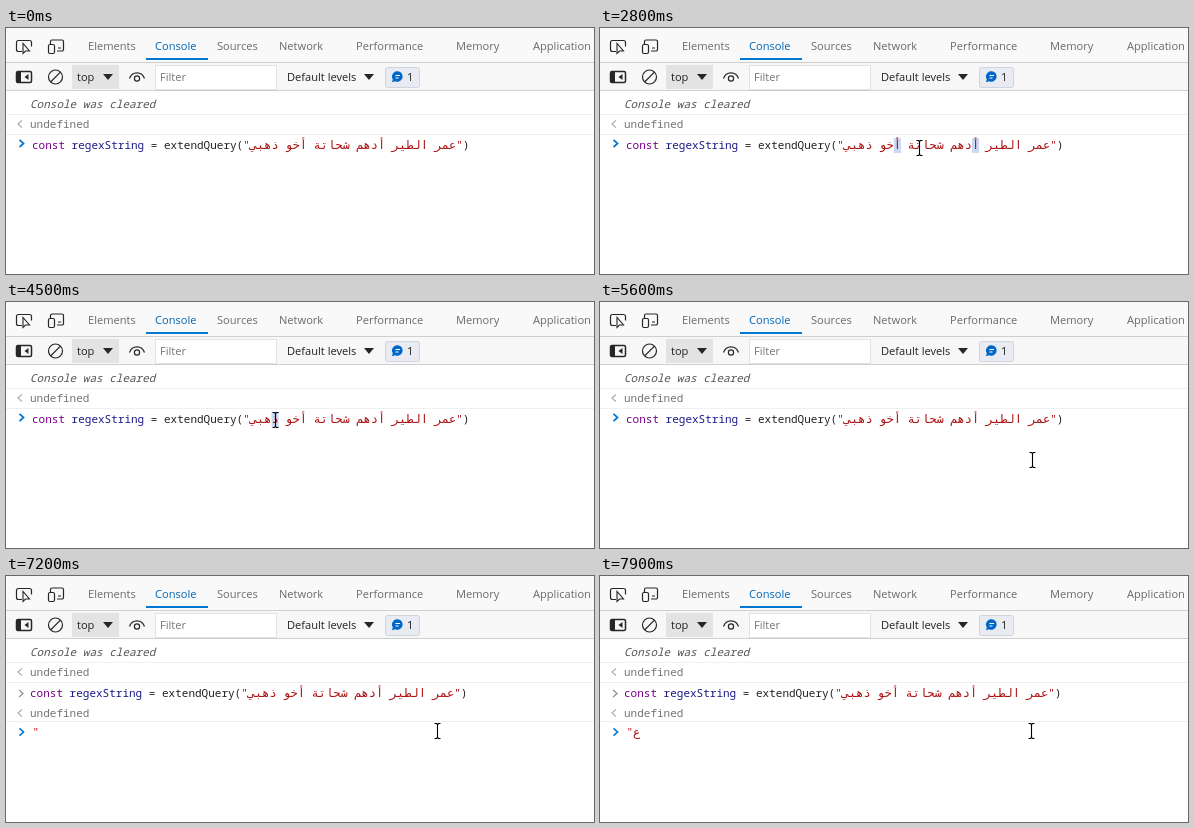
Recreate the animation shown at these times as an HTML page. Size 588 px wide and 246 px high, loop 8000 ms.

```html
<!DOCTYPE html>
<html lang="en">
<head>
<meta charset="utf-8">
<title>Console</title>
<style>
html, body { margin: 0; width: 100%; height: 100%; overflow: hidden; background: #fff; }
svg { display: block; width: 588px; height: 246px; }
text { white-space: pre; }
.ui { font: 11.1px "Open Sans", "Noto Sans", sans-serif; fill: #222; }
.mono { font: 11px "Noto Sans Mono", "DejaVu Sans Mono", monospace; fill: #222; }
.ar { font: 12px "DejaVu Sans Mono", monospace; word-spacing: -.62px; }
.small { font: 9.3px "DejaVu Sans", sans-serif; }
.str { fill: #a11; }
.line { fill: none; stroke-width: 1.2; }
</style>
</head>
<body>
<svg id="stage" viewBox="0 0 588 246" direction="ltr"></svg>
<script>
const LOOP = 8000, STEP = 100;
const ENTER = 5900, QUOTE = 7200, POPUP = 7300, LETTER = 7800;
const GLYPH = 7.22, SPACE = 6.6, PHRASE_RIGHT = 450.1;
const PHRASE = 'عمر الطير أدهم شحاتة أخو ذهبي';

// Pointer path: time, x, y
const PATH = [
  [700, 600, 70], [900, 575, 100], [1200, 430, 152], [1400, 300, 70],
  [1600, 220, -5], [1800, 232, 34], [2100, 345, 108], [2300, 381, 118],
  [2500, 373, 119], [2800, 319.5, 120], [3000, 314, 118], [3200, 307, 118],
  [3400, 305, 119], [3700, 250, 118], [3900, 242, 118], [4100, 246, 118],
  [4300, 271, 118], [4500, 269, 118], [4700, 266, 119], [5000, 420, 184],
  [5400, 436, 165], [5700, 431.5, 155]
];

// Selected letter: from, to, letter (every match lights up)
const PICKS = [[2400, 3000, 'أ'], [3100, 3500, 'ة'], [3800, 4200, 'ي'], [4400, 4800, 'ذ']];

const HISTORY = [
  '"sulayman tarek".replace(/\\s+/," ")',
  '"sulayman qudaimat".trim().match(/[ao]h/g)',
  '"sulayman qudaimat".trim().match(/\\s/g)',
  '"sulayman qudaimat".trim().match(/ham/g)',
  '"sulayman qudaimat".trim().replace(/\\s/g," ")',
  '"sulayman qudaimat".trim().replace(/\\s/g,"\\s")',
  '"sulayman qudaimat".trim().replace(/\\s/g,/\\s/)',
  '"<tspan class="small">أدهم سيفالزهر شحاتة بهجت نورالحق</tspan>".replace(/<tspan class="small">زهر</tspan>/,"")'
];

const TABS = [['Elements', 82], ['Console', 149], ['Sources', 211], ['Network', 273],
  ['Performance', 350], ['Memory', 450], ['Application', 527]];

const text = (x, y, str, cls, style = '') =>
  `<text x="${x}" y="${y}" class="${cls}" style="${style}">${str}</text>`;
const rect = (x, y, w, h, fill, attrs = '') =>
  `<rect x="${x}" y="${y}" width="${w}" height="${h}" fill="${fill}" ${attrs}/>`;
const path = (d, stroke, width = 1.2) =>
  `<path class="line" d="${d}" stroke="${stroke}" style="stroke-width:${width}"/>`;
const chevron = (x, y, color, width = 1.2, dir = 1) =>
  path(`M${x - 2 * dir} ${y - 3.6}l${4 * dir} 3.6l${-4 * dir} 3.6`, color, width);
const triangle = (x, y, color, r = 5, h = 6) =>
  `<path d="M${x - r} ${y - h / 2}h${2 * r}l${-r} ${h}z" fill="${color}"/>`;
const group = (id, body) => `<g id="${id}">${body}</g>`;

function toolbar() {
  const ink = '#262626', blue = '#0067b8';
  const tabs = TABS.map(([name, x]) =>
    text(x, 22, name, 'ui', `fill:${name === 'Console' ? blue : '#6a6a6a'}`)).join('');
  return rect(0, 0, 588, 34, '#f9f9f9') + rect(0, 34, 588, 28, '#f7f7f7') +
    rect(0, 34, 588, 1, '#cfcfcf') + rect(0, 62, 588, 1, '#cfcfcf') +
    path('M16 23.5h-3.5a2 2 0 0 1-2-2v-7a2 2 0 0 1 2-2h11a2 2 0 0 1 2 2v4', ink) +
    `<path d="M17 15.5v10l2.5-2.5h4z" fill="#f9f9f9" stroke="${ink}" stroke-width="1.1"/>` +
    path('M44.5 17v-3.5a1.5 1.5 0 0 1 1.5-1.5h10a1.5 1.5 0 0 1 1.5 1.5v8a1.5 1.5 0 0 1-1.5 1.5h-5M52 20h3', ink) +
    rect(42.5, 16.5, 6, 9, '#f9f9f9', `rx="1.5" stroke="${ink}" stroke-width="1.2"`) +
    tabs + rect(140, 30, 62, 2, '#0078d4') +
    rect(10.5, 43.5, 15, 11, 'none', `rx="1.5" stroke="${ink}" stroke-width="1.5"`) +
    rect(11, 44, 4, 10, ink) + `<path d="M22.5 46v6l-4-3z" fill="${ink}"/>` +
    `<circle cx="49.5" cy="49" r="7" class="line" stroke="${ink}"/>` + path('M44.6 54l9.8-9.9', ink) +
    rect(66, 37, 47, 24, '#e3e3e3') + text(71, 53, 'top', 'ui') + triangle(102, 49, ink) +
    path('M123.5 50.5c2.5-7.5 12.5-7.5 15 0', ink) +
    `<circle cx="131" cy="50.5" r="2.6" class="line" stroke="${ink}"/>` +
    rect(149.5, 37.5, 121, 24, '#fff', 'stroke="#e2e2e2"') + text(154, 53, 'Filter', 'ui', 'fill:#757575') +
    text(281, 53, 'Default levels', 'ui') + triangle(363, 49, ink) +
    rect(379.5, 39.5, 34, 20, '#e8ebf1', 'rx="2" stroke="#d0d4dc"') +
    '<path d="M387 45.5a5.3 5.3 0 1 1 2 7.8l-3 1 .8-3a5 5 0 0 1 .2-5.8z" fill="#0067c8"/>' +
    '<path d="M389.5 47.5h4.5M389.5 50h3" stroke="#fff"/>' +
    text(401, 53, '1', 'ui');
}

function command() {
  return text(26, 121,
    '<tspan fill="#708">const</tspan> <tspan fill="#1a1a86">regexString</tspan> = extendQuery(' +
    `<tspan class="str">"<tspan class="ar">${PHRASE}</tspan>"</tspan>)`, 'mono');
}

function popup() {
  const rows = HISTORY.map((code, i) => {
    const y = 11.5 + i * 18.3;
    return chevron(33.5, y, i ? '#3367d6' : '#111', 1.3) +
      text(i ? 508 : 376, y + 4, code, 'mono', 'text-anchor:end');
  }).join('');
  return rect(27, 2, 505, 152, '#000', 'opacity=".12"') +
    rect(26.5, .5, 503, 149.5, '#e8e8e8', 'stroke="#b8b8b8"') +
    rect(27, 2, 487, 18, '#fff') +
    rect(27.5, 2.5, 486, 17, 'none', 'stroke="#333" stroke-dasharray="1 1"') + rows +
    rect(483.5, 4.5, 25, 13, '#fff', 'rx="2" stroke="#c8c8c8"') +
    text(496, 14, 'tab', 'mono', 'text-anchor:middle;font-size:10px;fill:#777') +
    rect(514, 1, 15, 149, '#f1f1f1') + rect(514.5, 19, 13, 44, '#c1c1c1') +
    '<path d="M517.5 12.5h7l-3.5-4z" fill="#a3a3a3"/>' + triangle(521, 140, '#505050', 3.5, 4);
}

const stage = document.getElementById('stage');
stage.innerHTML = rect(0, 0, 588, 246, '#fff') + toolbar() +
  group('edge', rect(64, 0, 524, 1, '#cfcfcf')) +
  text(24, 80, 'Console was cleared', 'mono', 'font-style:italic;fill:#555') +
  rect(0, 86, 588, 1, '#f0f0f0') + chevron(14, 96, '#aaa', 1.2, -1) +
  text(24, 100, 'undefined', 'mono', 'fill:#757575') + rect(0, 106, 588, 1, '#f0f0f0') +
  group('marks', '') + group('command', command()) +
  group('editing', chevron(15.5, 115.5, '#0078d4', 1.8)) +
  group('result', chevron(15, 117.5, '#888') + chevron(14, 137, '#aaa', 1.2, -1) +
    text(24, 141, 'undefined', 'mono', 'fill:#757575') +
    rect(0, 145, 588, 1, '#f0f0f0') + chevron(15.5, 156, '#0078d4', 1.6)) +
  group('caret', rect(25, 150, 1, 14, '#000')) +
  group('quote', text(26.5, 160, '"', 'mono', 'fill:#c41a16')) +
  group('letter', text(33, 160, 'ع', 'ar str')) +
  group('popup', popup()) +
  group('arrow', '<path d="M0 0v15.5l3.6-3.4 2.5 5.7 2.3-1-2.5-5.6h5z" fill="#fff" stroke="#000" stroke-width=".9"/>') +
  group('beam', path('M-3 -7.5h2l1 1v13l-1 1h-2M3 -7.5h-2l-1 1M3 7.5h-2l-1-1', '#000', 1.1));

const parts = {};
stage.querySelectorAll('g[id]').forEach(g => { parts[g.id] = g; });
const show = (id, on) => parts[id].setAttribute('visibility', on ? 'visible' : 'hidden');
const move = (id, x, y) => parts[id].setAttribute('transform', `translate(${x} ${y})`);

function pointer(t) {
  const i = PATH.findIndex(k => k[0] > t);
  if (i === 0) return null;
  if (i < 0) return PATH[PATH.length - 1].slice(1);
  const [t0, x0, y0] = PATH[i - 1], [t1, x1, y1] = PATH[i];
  const p = (t - t0) / (t1 - t0), e = p * p * (3 - 2 * p);
  return [x0 + (x1 - x0) * e, y0 + (y1 - y0) * e];
}

// Walks the phrase from its right end
function marks(t) {
  const pick = PICKS.find(([from, to]) => t >= from && t < to);
  if (!pick) return '';
  let x = PHRASE_RIGHT;
  return [...PHRASE].map(c => {
    x -= c === ' ' ? SPACE : GLYPH;
    return c === pick[2] ? rect(x, 110, GLYPH, 15, '#c9daf5') : '';
  }).join('');
}

function update(time) {
  const t = Math.floor(time % LOOP / STEP) * STEP;
  const done = t >= ENTER;
  parts.marks.innerHTML = marks(t);
  move('command', done ? -2 : 0, 0);
  show('editing', !done);
  show('result', done);
  show('caret', done && t < QUOTE && Math.floor((t - ENTER) / 500) % 2 === 0);
  show('quote', t >= QUOTE);
  show('letter', t >= LETTER);
  show('popup', t >= POPUP && t < LETTER);

  const at = pointer(t);
  const overText = at && at[1] > 62;
  show('edge', at && at[1] < 10);
  show('beam', overText);
  show('arrow', at && !overText);
  if (overText) move('beam', Math.floor(at[0]) + .5, Math.round(at[1]));
  else if (at) move('arrow', ...at.map(Math.round));
}

const start = performance.now();
function tick() {
  update(performance.now() - start);
  requestAnimationFrame(tick);
}
tick();
</script>
</body>
</html>
```
